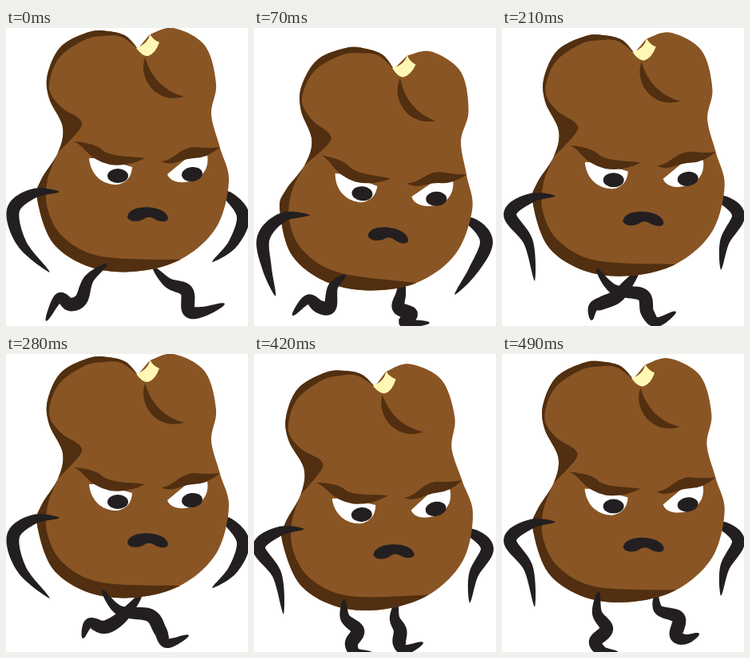
Write an HTML page with a canvas that moves like this. It is 303 by 373 pixels and loops after 0.56 s.

```html
<!DOCTYPE html>
<html lang="en">
<head>
<meta charset="utf-8">
<title>Grumpy bean walk</title>
<style>
  html, body { margin: 0; width: 100%; height: 100%; overflow: hidden; background: #fff; }
  canvas { display: block; }
</style>
</head>
<body>
<canvas id="stage" width="303" height="373"></canvas>
<script>
const canvas = document.getElementById('stage');
const ctx = canvas.getContext('2d');
const STEP = 70;
const BROWN = '#895524', DARK = '#512f10', INK = '#231f20', CREAM = '#fff8b4', WHITE = '#fff';

// Turns a flat x, y list into a function that gives the point at u = 0..1.
function spline(flat) {
  const last = flat.length / 2 - 1;
  const at = (i, axis) => flat[2 * Math.max(0, Math.min(last, i)) + axis];
  return u => {
    const i = Math.min(last - 1, Math.floor(u * last));
    const t = u * last - i;
    return [0, 1].map(axis => {
      const [a, b, c, d] = [-1, 0, 1, 2].map(k => at(i + k, axis));
      return b + t / 2 * (c - a + t * (2 * a - 5 * b + 4 * c - d + t * (3 * (b - c) + d - a)));
    });
  };
}

function trace(path, flat) {
  const point = spline(flat);
  const count = flat.length * 5;
  for (let i = 0; i <= count; i++) path.lineTo(...point(i / count));
}

// A ribbon along a spine, pointed at both ends.
function limb(flat, width, power) {
  const point = spline(flat);
  const count = 60;
  const left = [], right = [];
  for (let i = 0; i <= count; i++) {
    const u = i / count;
    const [x, y] = point(u);
    const [ax, ay] = point(Math.max(0, u - 0.01));
    const [bx, by] = point(Math.min(1, u + 0.01));
    const half = width / 2 * Math.max(0, Math.sin(Math.PI * u)) ** power;
    const scale = half / (Math.hypot(bx - ax, by - ay) || 1);
    const nx = (ay - by) * scale, ny = (bx - ax) * scale;
    left.push([x + nx, y + ny]);
    right.unshift([x - nx, y - ny]);
  }
  const path = new Path2D();
  for (const p of [...left, ...right]) path.lineTo(...p);
  path.closePath();
  return path;
}

const arm = (...flat) => limb(flat, 16, 0.85);
const leg = (...flat) => limb(flat, 17, 0.6);

const outline = new Path2D();
trace(outline, [
  165, 26, 150, 10, 128, 4, 104, 5, 69, 23, 52, 58, 54, 88, 71, 124, 65, 156, 44, 190, 39, 214, 58, 268,
  102, 298, 158, 305, 218, 290, 263, 250, 279, 192, 268, 150, 257, 108, 263, 70, 249, 22, 210, 0, 180, 8
]);
outline.closePath();

// Everything left of this edge lies in shade.
const shade = new Path2D();
trace(shade, [165, 26, 144, 11, 122, 10, 98, 15, 66, 38, 54, 74, 68, 98, 92, 114, 92, 127, 65, 156]);
trace(shade, [65, 156, 52, 190, 52, 226, 72, 262, 120, 286, 218, 290]);
shade.lineTo(218, 320);
shade.lineTo(0, 320);
shade.lineTo(0, 0);
shade.lineTo(165, 0);

const crease = new Path2D('M174 37C165 62 187 96 223 86Q186 76 174 37');
const bite = new Path2D('M180 7Q179 19 163 25Q171 36 178 35Q187 32 192 18Q184 15 180 7');
const leftEye = new Path2D('M104 163C106 185 122 197 140 196Q157 192 158 174L120 163');
const rightEye = new Path2D('M202 183C206 195 226 196 240 188Q255 178 252 159L225 164');
const leftBrow = new Path2D('M85 142Q113 144 122 154C135 162 155 160 174 163Q153 174 130 171Q111 167 98 152Q92 145 85 142');
const rightBrow = new Path2D('M194 167C212 165 216 150 236 149Q254 151 268 149Q252 163 235 163C218 164 210 174 194 167');
const mouth = new Path2D('M152 236C154 219 201 221 203 238C202 245 190 242 186 239Q178 234 171 240C162 244 152 241 152 236');

const arms = {
  wide: [arm(67, 205, 35, 207, 9, 228, 20, 270, 55, 306), arm(258, 204, 279, 211, 297, 236, 284, 270, 258, 293)],
  low: [arm(70, 234, 36, 237, 12, 262, 16, 300, 27, 336), arm(248, 240, 274, 244, 291, 268, 274, 304, 251, 334)],
  bent: [arm(66, 220, 35, 223, 9, 243, 32, 278, 40, 327), arm(250, 222, 277, 226, 295, 245, 278, 277, 273, 313)],
  curved: [arm(57, 236, 29, 249, 13, 283, 26, 320, 48, 348), arm(246, 222, 273, 226, 289, 248, 279, 284, 258, 319)]
};

const frontLegs = [
  leg(127, 295, 104, 314, 94, 340, 80, 346, 66, 338, 50, 367),
  leg(115, 309, 99, 324, 95, 349, 82, 349, 67, 340, 48, 360),
  leg(115, 307, 142, 329, 172, 338, 172, 360, 176, 374, 196, 374),
  leg(118, 301, 140, 327, 176, 334, 182, 356, 194, 368, 218, 355),
  leg(120, 295, 142, 321, 180, 327, 193, 346, 202, 362, 229, 352),
  leg(108, 317, 126, 337, 136, 350, 124, 362, 130, 374, 156, 374),
  leg(113, 307, 114, 330, 130, 346, 122, 362, 128, 374, 148, 374),
  leg(121, 297, 119, 324, 131, 344, 117, 360, 126, 372, 146, 374)
];

// dx, dy, tilt move the body; armX, armY shift the arm pose.
const pose = (dx, dy, tilt, arm, armX = 0, armY = 0) => ({ dx, dy, tilt, arm, armX, armY });
const walk = [
  pose(0, 0, 0, 'wide'),
  pose(0, 26, 0.092, 'low'),
  pose(-1, 16, 0.042, 'bent'),
  pose(0, 5.5, 0.006, 'bent', 1, -10),
  pose(0, 0, 0, 'wide'),
  pose(-17, 23.5, -0.112, 'curved'),
  pose(-8, 14, -0.055, 'bent', -3, -1),
  pose(-0.5, 5.5, -0.003, 'bent', 1, -10)
];

const backLegs = [
  leg(184, 299, 203, 319, 226, 329, 229, 354, 247, 355, 274, 345),
  leg(187, 308, 184, 332, 181, 350, 197, 358, 188, 369, 220, 369),
  leg(170, 305, 167, 328, 172, 345, 152, 360, 178, 362, 201, 350),
  leg(172, 302, 158, 320, 144, 336, 126, 344, 114, 350, 112, 366),
  leg(170, 300, 154, 320, 138, 335, 122, 342, 104, 337, 96, 356),
  leg(170, 312, 158, 330, 145, 346, 130, 348, 112, 344, 105, 356),
  leg(179, 308, 176, 330, 183, 346, 182, 362, 190, 370, 212, 361),
  leg(193, 298, 196, 320, 221, 330, 218, 352, 230, 357, 247, 350)
];

function fill(path, color, x = 0, y = 0) {
  ctx.save();
  ctx.translate(x, y);
  ctx.fillStyle = color;
  ctx.fill(path);
  ctx.restore();
}

function pupil(x, y, turn) {
  ctx.fillStyle = INK;
  ctx.beginPath();
  ctx.ellipse(x, y, 13, 9, turn, 0, Math.PI * 2);
  ctx.fill();
}

function drawBody({ dx, dy, tilt }) {
  const px = 178, py = 134;
  ctx.save();
  ctx.translate(px + dx, py + dy);
  ctx.rotate(tilt);
  ctx.translate(-px, -py);

  fill(outline, BROWN);
  ctx.save();
  ctx.clip(outline);
  fill(shade, DARK);
  ctx.restore();

  fill(crease, DARK);
  fill(bite, CREAM);
  fill(leftEye, WHITE);
  fill(rightEye, WHITE);
  pupil(140, 185, 0);
  pupil(233, 183, -0.12);
  fill(leftBrow, DARK);
  fill(rightBrow, DARK);
  fill(mouth, INK);
  ctx.restore();
}

function draw() {
  const step = Math.floor(performance.now() / STEP) % walk.length;
  const now = walk[step];
  const [frontArm, backArm] = arms[now.arm];

  ctx.fillStyle = WHITE;
  ctx.fillRect(0, 0, canvas.width, canvas.height);
  fill(backArm, INK, now.armX, now.armY);
  fill(backLegs[step], INK);
  drawBody(now);
  fill(frontLegs[step], INK);
  fill(frontArm, INK, now.armX, now.armY);
  requestAnimationFrame(draw);
}
draw();
</script>
</body>
</html>
```
